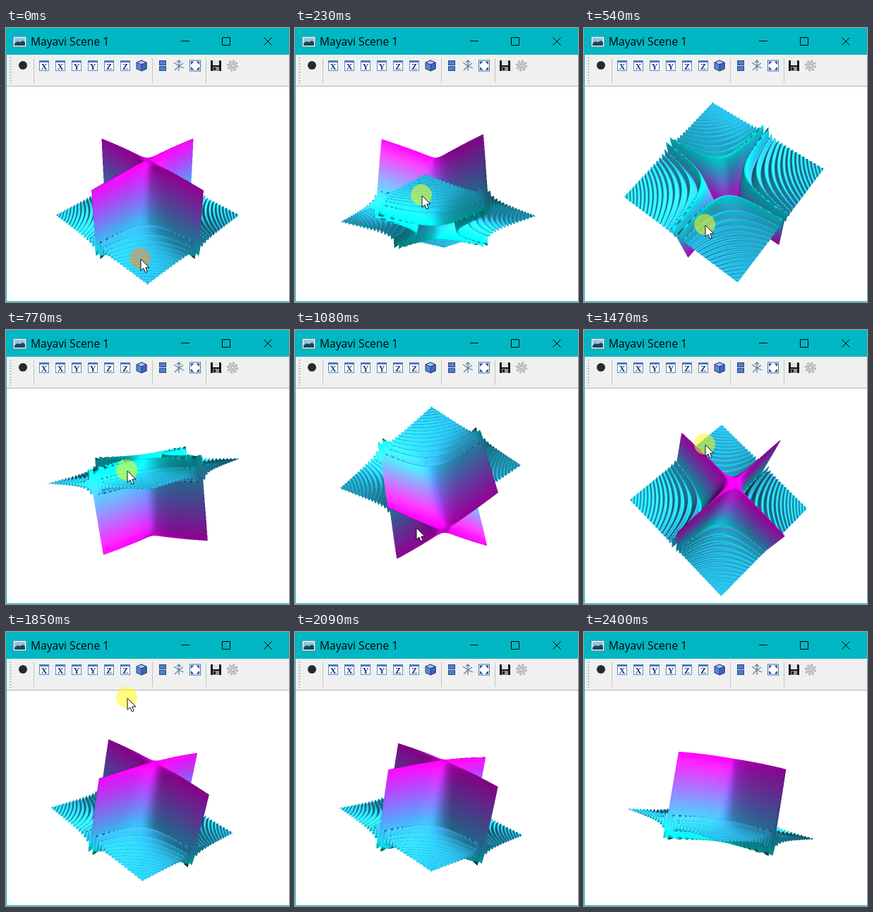
Animation, 401 px wide and 389 px high, one loop 2.48 s. Source, as an HTML page with a canvas:

```html
<!DOCTYPE html>
<html lang="en">
<head>
<meta charset="utf-8">
<title>Mayavi Scene 1</title>
<style>
html, body { margin: 0; width: 100%; height: 100%; overflow: hidden; background: #fff; }
#scene { position: absolute; left: 1px; top: 83px; width: 400px; height: 305px; }
svg { position: absolute; left: 0; top: 0; }
</style>
</head>
<body>
<canvas id="scene" width="800" height="610"></canvas>
<svg width="401" height="389" viewBox="0 0 401 389">
  <defs>
    <g id="box">
      <rect x="-6.5" y="-6.5" width="13" height="14" fill="#fff" stroke="#5b8cc8"/>
      <rect x="-7" y="-7" width="14" height="3" fill="#4a7cc0"/>
    </g>
    <path id="corner" d="M-6 -6H-1.500L-6 -1.500Z" fill="#1d4e8f"/>
  </defs>
  <rect width="401" height="39" fill="#00b7c3"/>
  <rect y="38" width="401" height="44" fill="#f0f0f0"/>
  <rect y="82" width="401" height="1" fill="#b4b4b4"/>
  <path d="M.5 38V388.5H401" fill="none" stroke="#00b7c3"/>

  <rect x="10.5" y="12.5" width="18" height="14" fill="#fff" stroke="#8a9aa0"/>
  <rect x="12" y="14" width="15" height="11" fill="#8cc4ea"/>
  <path d="M12 22L16 19 20 20 24 18 27 20V25H12Z" fill="#1e4650"/>
  <text x="35" y="25" font-family="'Open Sans', sans-serif" font-size="15.6">Mayavi Scene 1</text>
  <path d="M248 18.5H260M306.5 13.5H317.5V24.5H306.5ZM365.5 13.5L376.5 24.5M376.5 13.5L365.5 24.5" fill="none" stroke="#000"/>

  <path d="M6.5 42V79" stroke="#a8a8a8" stroke-width="2" stroke-dasharray="1.5 2.5"/>
  <path d="M39.5 43V78M207.5 43V78M283.5 43V78" stroke="#c4c4c4"/>
  <circle cx="24" cy="53" r="6" fill="#232b2c"/>
  <g id="axes" font-family="'Liberation Serif', serif" font-weight="bold" font-size="12" text-anchor="middle" fill="#173a78"></g>

  <g transform="translate(192 53)" stroke="#22407f" stroke-linejoin="round">
    <path d="M0 -7L7 -4V5L0 8 -7 5V-4Z" fill="#5c86d6"/>
    <path d="M-7 -4L0 -7 7 -4 0 -1Z" fill="#a9c4f2"/>
    <path d="M0 -1L7 -4V5L0 8Z" fill="#3f66b8"/>
  </g>
  <g fill="#4f7fd0" stroke="#27477f">
    <rect x="217.5" y="46.5" width="9" height="6"/>
    <rect x="217.5" y="54.5" width="9" height="6"/>
  </g>
  <path d="M245 61V46M242 49L245 46 248 49M238 49L245 54 252 57M251 50L245 54 239 60" fill="none" stroke="#5d869a" stroke-width="1.3"/>
  <g transform="translate(268 53.5)">
    <rect x="-7.5" y="-7.5" width="15" height="15" fill="#fff" stroke="#3f6fb5"/>
    <use href="#corner"/>
    <use href="#corner" transform="rotate(90)"/>
    <use href="#corner" transform="rotate(180)"/>
    <use href="#corner" transform="rotate(270)"/>
  </g>
  <path d="M290 46H304L305 47V61H290Z" fill="#151515"/>
  <rect x="293" y="46" width="9" height="7" fill="#dfe5e8"/>
  <rect x="293" y="55" width="9" height="6" fill="#8d9699"/>
  <rect x="294" y="56" width="3" height="4" fill="#151515"/>
  <g transform="translate(321 53.5)" fill="none">
    <circle r="7" stroke="#aaa" stroke-width="2" stroke-dasharray="3 2.5"/>
    <circle r="4.5" stroke="#c4c4c4" stroke-width="3"/>
    <circle r="2.2" fill="#f4f4f4" stroke="#8e8e8e"/>
  </g>

  <g id="cursor">
    <circle id="press" cx="-1" cy="-1" r="15" fill-opacity=".55"/>
    <path d="M0 0V16.5L3.8 13 6.5 19 9.3 17.8 6.7 12H12Z" fill="#fff" stroke="#111"/>
  </g>
</svg>
<script>
const $ = id => document.getElementById(id);
[...'XXYYZZ'].forEach((ch, i) => {
  $('axes').innerHTML += `<g transform="translate(${54 + 23 * i} 53)"><use href="#box"/><text y="6">${ch}</text></g>`;
});

const LOOP = 2480, STEP = 77.5, RAD = Math.PI / 180;
const ease = (k, start, span) => {
  const x = Math.max(0, Math.min(1, (k - start) / span));
  return x * x * (3 - 2 * x);
};

// each upward drag carries the camera further around the horizontal axis
const DRAGS = [
  { start: -0.1, span: 7.2, y: [328, 100], pitch: [35.3, -115] },
  { start: 6.9, span: 6, y: [280, 127], pitch: [-115, -215.5] },
  { start: 14, span: 8.5, y: [281, 94], pitch: [-215.5, -331.5] },
  { start: 24.5, span: 7, y: [94, 94], pitch: [-331.5, -356], hidden: true }
];

function poseAt(k) {
  const drag = DRAGS.findLast(d => d.start <= k);
  const f = ease(k, drag.start, drag.span);
  const along = ([a, b]) => a + (b - a) * f;
  return {
    pitch: along(drag.pitch),
    tilt: 9.3 * ease(k, 2, 12),
    spin: 7.2 * (ease(k, 0, 4.5) - ease(k, 7, 6)),
    x: 191 - 19 * ease(k, 0, 5.5),
    y: along(drag.y),
    pressed: k > drag.start,
    hidden: drag.hidden
  };
}

// surface z = sin(xy) / (xy) on [-10, 10]²
const N = 200, HEIGHT = 0.99, COUNT = N * N;
const floats = () => new Float32Array(COUNT);
const gx = floats(), gy = floats(), gz = floats(), hue = floats();
const nx = floats(), ny = floats(), nz = floats();
const sx = floats(), sy = floats(), near = floats(), front = floats(), back = floats();
const coord = i => -1 + 2 * i / (N - 1);

for (let i = 0; i < N; i++) for (let j = 0; j < N; j++) {
  const n = i * N + j, p = 100 * coord(i) * coord(j), s = Math.sin(p) / p;
  gx[n] = coord(i);
  gy[n] = coord(j);
  gz[n] = HEIGHT * (s - 0.3915);
  hue[n] = (s + 0.217) / 1.217;
}
for (let i = 0; i < N; i++) for (let j = 0; j < N; j++) {
  const n = i * N + j;
  const i0 = Math.max(i - 1, 0), i1 = Math.min(i + 1, N - 1);
  const j0 = Math.max(j - 1, 0), j1 = Math.min(j + 1, N - 1);
  const dx = (gz[i1 * N + j] - gz[i0 * N + j]) / (coord(i1) - coord(i0));
  const dy = (gz[i * N + j1] - gz[i * N + j0]) / (coord(j1) - coord(j0));
  const len = Math.hypot(dx, dy, 1);
  nx[n] = -dx / len;
  ny[n] = -dy / len;
  nz[n] = 1 / len;
}

// lights fixed to the camera: elevation, azimuth, strength
const light = (el, az, power) => [
  Math.cos(el * RAD) * Math.sin(az * RAD),
  Math.sin(el * RAD),
  Math.cos(el * RAD) * Math.cos(az * RAD)
].map(v => v * power);
const LIGHTS = [light(45, 45, 1), light(-30, -60, 0.6), light(-30, 60, 0.6)];

const W = 800, H = 610, FOCAL = 1148, DIST = 6.03, CX = 399, CY = 307;
const ctx = $('scene').getContext('2d');
const img = ctx.createImageData(W, H);
const pix = new Uint32Array(img.data.buffer), depth = new Float32Array(W * H);

function project({ pitch, tilt, spin }) {
  const sinCos = deg => [Math.sin(deg * RAD), Math.cos(deg * RAD)];
  const [st, ct] = sinCos(pitch), [sr, cr] = sinCos(tilt), [sa, ca] = sinCos(45 + spin);
  const out = [0, 0, 0];
  const turn = (x, y, z) => {
    const u = x * ca - y * sa, v = x * sa + y * ca, w = cr * z - sr * u;
    out[0] = cr * u + sr * z;
    out[1] = w * ct - v * st;
    out[2] = v * ct + w * st;
  };
  for (let n = 0; n < COUNT; n++) {
    turn(gx[n], gy[n], gz[n]);
    near[n] = 1 / (DIST - out[2]);
    sx[n] = CX + FOCAL * out[0] * near[n];
    sy[n] = CY - FOCAL * out[1] * near[n];
    turn(nx[n], ny[n], nz[n]);
    let f = 0, b = 0;
    for (const l of LIGHTS) {
      const d = out[0] * l[0] + out[1] * l[1] + out[2] * l[2];
      if (d > 0) f += d; else b -= d;
    }
    front[n] = f;
    back[n] = b;
  }
}

// depth-tested triangle, lit on the side that faces the camera
function triangle(a, b, c, flip) {
  const ax = sx[a], ay = sy[a], bx = sx[b], by = sy[b], cx = sx[c], cy = sy[c];
  const area = (bx - ax) * (cy - ay) - (by - ay) * (cx - ax);
  if (!area) return;
  const lit = area * flip > 0 ? front : back;
  const x0 = Math.max(0, Math.ceil(Math.min(ax, bx, cx) - 0.5));
  const x1 = Math.min(W - 1, Math.floor(Math.max(ax, bx, cx) - 0.5));
  const y0 = Math.max(0, Math.ceil(Math.min(ay, by, cy) - 0.5));
  const y1 = Math.min(H - 1, Math.floor(Math.max(ay, by, cy) - 0.5));
  for (let y = y0; y <= y1; y++) for (let x = x0; x <= x1; x++) {
    const px = x + 0.5, py = y + 0.5;
    const p = ((bx - px) * (cy - py) - (by - py) * (cx - px)) / area;
    const q = ((cx - px) * (ay - py) - (cy - py) * (ax - px)) / area;
    const r = 1 - p - q;
    if (p < -1e-5 || q < -1e-5 || r < -1e-5) continue;
    const d = p * near[a] + q * near[b] + r * near[c], at = y * W + x;
    if (d <= depth[at]) continue;
    depth[at] = d;
    const t = p * hue[a] + q * hue[b] + r * hue[c];
    const l = 255 * (p * lit[a] + q * lit[b] + r * lit[c]);
    const red = Math.max(0, Math.min(255, l * t));
    const green = Math.max(0, Math.min(255, l * (1 - t)));
    pix[at] = 0xff000000 | Math.min(255, l) << 16 | green << 8 | red;
  }
}

function render(k) {
  const pose = poseAt(k);
  project(pose);
  pix.fill(0xffffffff);
  depth.fill(0);
  for (let i = 0; i < N - 1; i++) for (let j = 0; j < N - 1; j++) {
    const n = i * N + j;
    triangle(n, n + N, n + 1, 1);
    triangle(n + N + 1, n + N, n + 1, -1);
  }
  ctx.putImageData(img, 0, 0);

  $('cursor').setAttribute('transform', `translate(${Math.round(pose.x)} ${Math.round(pose.y)})`);
  $('cursor').setAttribute('visibility', pose.hidden ? 'hidden' : 'visible');
  $('press').setAttribute('fill', !pose.pressed ? 'none' : k ? '#fffa14' : '#ff8c32');
}

const start = performance.now();
let shown = -1;
function tick() {
  const t = (performance.now() - start) % LOOP;
  const k = t < 75 ? 0 : Math.min(31, Math.floor((t + 10) / STEP));
  if (k !== shown) render(shown = k);
  requestAnimationFrame(tick);
}
tick();
</script>
</body>
</html>
```
